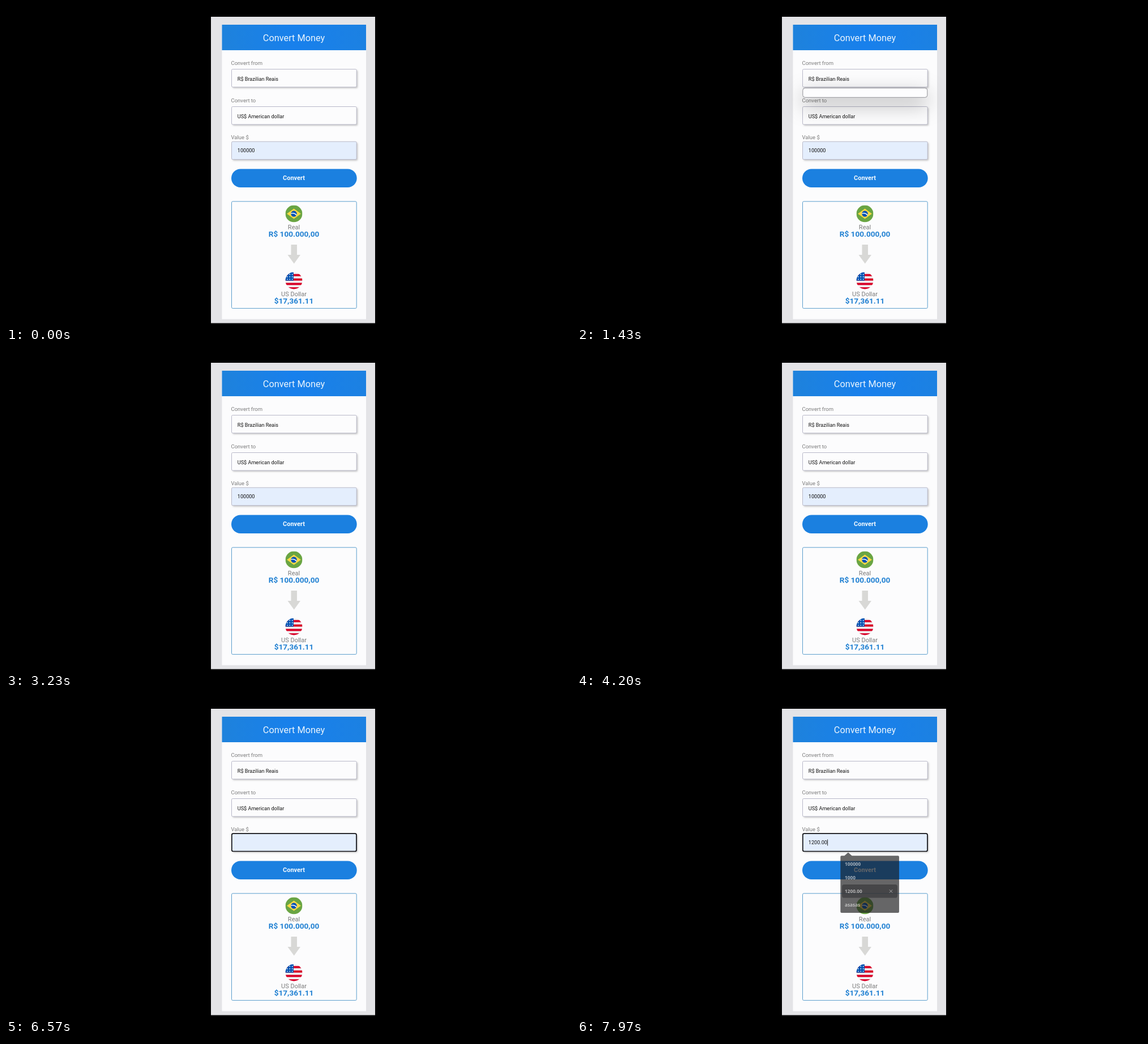
An HTML page with a canvas that plays this animation: 998x561 px, repeating every 8000 ms.

```html
<!DOCTYPE html>
<html lang="en">
<head>
<meta charset="utf-8">
<title>Convert Money</title>
<style>
  html, body { margin: 0; width: 100%; height: 100%; overflow: hidden; background: #000; }
  canvas { display: block; }
</style>
</head>
<body>
<canvas id="stage" width="998" height="561"></canvas>
<script>
const ctx = document.getElementById('stage').getContext('2d');
const LOOP = 8000;
const ROBOTO = 'Roboto, sans-serif';
const MENU_FONT = '"Noto Sans", sans-serif';
const BLUE = '#1b80e0';
const CENTER = 508.5;
const LEFT = 398;
const WIDTH = 222;

// Moments of the interaction, in ms
const T = {
  listOpen: 1400, listClose: 2150,
  focus: 4900, select: 5250, clear: 5900,
  menu: 6600, hover0: 6850, hover1: 7050, hover2: 7450, pick: 7900
};

const clamp = v => Math.max(0, Math.min(1, v));
const progress = (t, start, length) => clamp((t - start) / length);

function rect(x, y, w, h, fill) {
  ctx.fillStyle = fill;
  ctx.fillRect(x, y, w, h);
}

function roundRect(x, y, w, h, r, fill, stroke, line = 1) {
  ctx.beginPath();
  ctx.roundRect(x, y, w, h, r);
  if (fill) {
    ctx.fillStyle = fill;
    ctx.fill();
  }
  if (stroke) {
    ctx.shadowColor = 'transparent';
    ctx.strokeStyle = stroke;
    ctx.lineWidth = line;
    ctx.stroke();
  }
}

function polygon(points, fill) {
  ctx.beginPath();
  points.forEach(([x, y]) => ctx.lineTo(x, y));
  ctx.fillStyle = fill;
  ctx.fill();
}

function disc(x, y, r, fill) {
  ctx.beginPath();
  ctx.arc(x, y, r, 0, Math.PI * 2);
  ctx.fillStyle = fill;
  ctx.fill();
}

function text(str, x, y, size, color, { weight = 400, align = 'left', font = ROBOTO } = {}) {
  ctx.font = `${weight} ${size}px ${font}`;
  ctx.textAlign = align;
  ctx.fillStyle = color;
  ctx.fillText(str, x, y);
}

function shadow(color, blur, dx, dy) {
  ctx.shadowColor = color;
  ctx.shadowBlur = blur;
  ctx.shadowOffsetX = dx;
  ctx.shadowOffsetY = dy;
}

function field(y, fill, focused) {
  ctx.save();
  shadow('rgba(0,0,0,.22)', 3, 2, 2);
  if (focused) roundRect(LEFT + 0.8, y + 0.5, WIDTH - 1.8, 31.3, 2.5, fill, '#101014', 1.7);
  else roundRect(LEFT + 0.5, y + 0.5, WIDTH - 1.3, 31.5, 2, fill, '#b9b9c9');
  ctx.restore();
}

function inFlag(cy, paint) {
  ctx.save();
  ctx.beginPath();
  ctx.arc(CENTER, cy, 15, 0, Math.PI * 2);
  ctx.clip();
  ctx.translate(CENTER, cy);
  paint();
  ctx.restore();
}

function brazil() {
  rect(-15, -15, 30, 30, '#6aa543');
  polygon([[0, -9.1], [12.4, 0], [0, 9.1], [-12.4, 0]], '#ffda44');
  disc(0, 0, 5.2, '#0052b4');
  ctx.beginPath();
  ctx.moveTo(-5.1, -0.5);
  ctx.quadraticCurveTo(1, -2.2, 4.6, 2.4);
  ctx.strokeStyle = '#f4f4f4';
  ctx.lineWidth = 1.6;
  ctx.stroke();
}

function unitedStates() {
  rect(-15, -15, 30, 30, '#f2f2f2');
  for (let i = 0; i < 4; i++) rect(-15, -11.7 + i * 7.8, 30, 3.9, '#d80027');
  rect(-15, -15, 14.4, 15, '#0052b4');
  for (let row = 0; row < 3; row++) {
    for (let col = 0; col < 3; col++) disc(-11.6 + col * 4.4, -11 + row * 4.3, 0.95, '#f2f2f2');
  }
}

function drawPage() {
  rect(0, 0, 998, 561, '#000');
  rect(362, 19, 290, 540.5, '#e4e4e7');
  rect(381.5, 33, 254.5, 519.5, '#fcfcfd');
  const header = ctx.createLinearGradient(381, 0, 636, 0);
  header.addColorStop(0, '#1e82dc');
  header.addColorStop(0.5, '#1880ec');
  header.addColorStop(1, '#1c81e2');
  rect(381.5, 33, 254.5, 45, header);
  text('Convert Money', CENTER, 62, 16.3, '#eaf4fd', { align: 'center' });

  text('Convert from', 397.5, 103.7, 9.5, '#7b7b7b');
  text('Convert to', 397.5, 169.5, 9.5, '#7b7b7b');
  text('Value $', 397.5, 235.2, 9.5, '#7b7b7b');
  field(111, '#fcfcfd');
  field(177, '#fcfcfd');
  text('R$ Brazilian Reais', 408.8, 132, 9.1, '#111');
  text('US$ American dollar', 408.8, 198, 9.1, '#111');

  roundRect(LEFT, 287.5, WIDTH - 0.3, 32.5, 16.2, BLUE);
  text('Convert', CENTER, 307, 11, '#f4faff', { weight: 700, align: 'center' });

  roundRect(LEFT + 0.5, 344.8, WIDTH - 1.3, 188.6, 2, null, '#5a9dcc');
  inFlag(366.5, brazil);
  text('Real', CENTER, 394, 11, '#7b7b7b', { align: 'center' });
  text('R$ 100.000,00', CENTER, 407.3, 13.6, '#2080d2', { weight: 700, align: 'center' });
  polygon([[503.5, 421], [514, 421], [514, 439], [520, 439], [508.8, 454.5], [497.5, 439], [503.5, 439]], '#d8d8d6');
  inFlag(484.5, unitedStates);
  text('US Dollar', CENTER, 512, 11, '#7b7b7b', { align: 'center' });
  text('$17,361.11', CENTER, 525.3, 13.6, '#2080d2', { weight: 700, align: 'center' });
}

function drawValue(t) {
  const focused = t >= T.focus;
  field(238.7, '#e4eefd', focused);
  const y = 258.3;
  const x = 408.8;
  let value = '100000';
  let preview = false;
  if (t >= T.clear) value = '';
  if (t >= T.hover0) {
    value = t < T.hover1 ? '100000' : t < T.hover2 ? '1000' : '1200.00';
    preview = t < T.pick;
  }
  const selected = t >= T.select && t < T.clear;
  if (selected) rect(409, 249.3, 30.7, 11.4, '#2b63c6');
  text(value, x, y, preview ? 8.6 : 9.1, selected ? '#dfe9fa' : '#111',
    preview ? { weight: 500, font: MENU_FONT } : {});
  const blinkOn = (t - T.clear) % 1000 < 500 || t >= T.pick;
  if (t >= T.clear && !preview && blinkOn) {
    rect(x + ctx.measureText(value).width + 0.3, 249.5, 0.9, 11, '#111');
  }
}

function drawList(t) {
  if (t < T.listOpen || t >= T.listClose) return;
  const h = 5 + 37 * progress(t, T.listOpen, 100);
  ctx.save();
  shadow('rgba(0,0,0,.36)', 34, 0, 12);
  roundRect(398.8, 144.8, 220, h, 4, '#fdfdfe', '#909096');
  ctx.clip();
  if (h > 20) {
    text('R$ Brazilian Reais', 405, 158.5, 9.1, '#111');
    text('US$ American dollar', 405, 177, 9.1, '#111');
  }
  ctx.restore();
}

function drawMenu(t) {
  if (t < T.menu) return;
  const shown = progress(t, T.menu, 100);
  const leaving = progress(t, T.pick + 30, 115);
  const scale = 0.95 + 0.05 * shown - 0.055 * leaving;
  const hover = t < T.hover0 ? -1 : t < T.hover1 ? 0 : t < T.hover2 ? 1 : 2;

  ctx.save();
  ctx.globalAlpha = shown * (1 - leaving * 0.95);
  ctx.translate(517, 328.5);
  ctx.scale(scale, scale);
  ctx.translate(-517, -328.5);
  ctx.beginPath();
  ctx.roundRect(464.3, 277.3, 105.7, 102.7, 2);
  ctx.moveTo(471.5, 277.3);
  ctx.lineTo(478.2, 271.3);
  ctx.lineTo(485, 277.3);
  ctx.closePath();
  ctx.fillStyle = '#1b1b1c';
  ctx.fill();

  ['100000', '1000', '1200.00', 'asasas'].forEach((item, i) => {
    const y = 292.3 + i * 24.4;
    if (i === hover) {
      roundRect(467, y - 12, 100, 24, 4, '#373738');
      ctx.beginPath();
      for (const d of [-2.8, 2.8]) {
        ctx.moveTo(555.3 - 2.8, y - d);
        ctx.lineTo(555.3 + 2.8, y + d);
      }
      ctx.strokeStyle = '#dcdcdc';
      ctx.lineWidth = 1;
      ctx.stroke();
    }
    text(item, 472.2, y + 3.2, 8.4, '#ececec', { weight: 600, font: MENU_FONT });
  });
  ctx.restore();
}

function draw(t) {
  drawPage();
  drawValue(t);
  drawList(t);
  drawMenu(t);
}

const start = performance.now();
function tick() {
  draw((performance.now() - start) % LOOP);
  requestAnimationFrame(tick);
}
tick();
</script>
</body>
</html>
```
